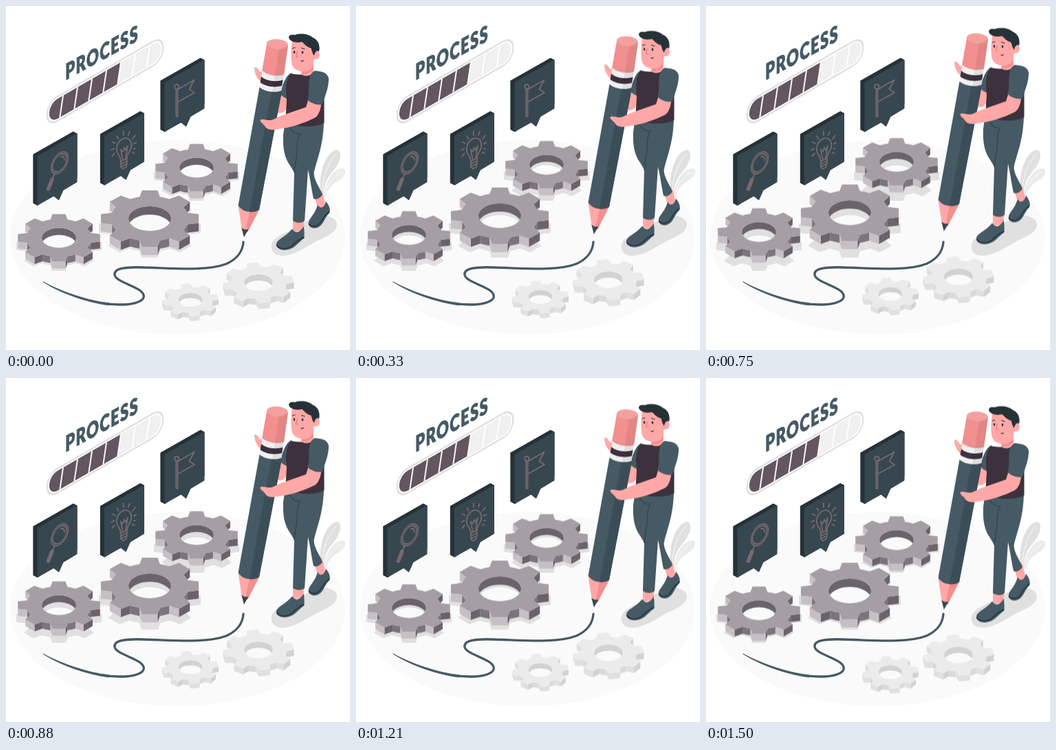
Recreate the animation shown at these times as an HTML page. Size 500 by 500 pixels, loop 1.54 s.

```html
<!DOCTYPE html>
<html lang="en">
<head>
<meta charset="utf-8">
<title>Process</title>
<style>
html, body { margin: 0; width: 100%; height: 100%; overflow: hidden; background: #fff; }
svg { display: block; width: 100%; height: 100%; }
.title { font: 900 32px Lato, "Open Sans", sans-serif; letter-spacing: 2px; fill: #455a64; stroke: #455a64; stroke-width: .9; }
.icon { fill: none; stroke: #75696f; stroke-width: 1.8; stroke-linecap: round; stroke-linejoin: round; }
.skin { fill: #ffa8a7; }
.cloth { fill: #455a64; }
.dark { fill: #263238; }
.line { fill: none; stroke-linecap: round; stroke-linejoin: round; }
</style>
</head>
<body>
<svg viewBox="0 0 500 500">
  <defs>
    <clipPath id="capsule"><rect x="4.5" y="-14.6" width="187.500" height="29" rx="14"/></clipPath>
    <g id="board" stroke-width="2" stroke-linejoin="round">
      <path d="M40.300 216 97.500 183.500 102.500 186 102.500 249 46 289 40.300 286Z" fill="#263238" stroke="#263238"/>
      <path d="M46.500 218.500 102.500 186.500 102.500 255.500 82.500 267.500 76.500 281 69.500 275.500 46.500 288.500Z" fill="#37474f" stroke="#37474f"/>
    </g>
  </defs>

  <ellipse cx="249" cy="336" rx="243.500" ry="141" fill="#fafafa"/>

  <text class="title" transform="matrix(.685 -.375 0 1 86.300 108)">PROCESS</text>
  <g transform="matrix(.866 -.5 0 1 59 158.500)">
    <rect x="1" y="-17.600" width="194.500" height="35.200" rx="17" fill="#fff" stroke="#e0e0e0" stroke-width="2.600"/>
    <g id="bar" clip-path="url(#capsule)">
      <rect width="196" y="-16" height="32" fill="#f0f0f0"/>
      <path d="M0-16H125L119 16H0Z" fill="#63565f"/>
    </g>
  </g>

  <use href="#board"/>
  <use href="#board" x="97.500" y="-29.500"/>
  <use href="#board" x="185" y="-107"/>

  <g class="icon">
    <g transform="matrix(.866 -.5 0 1 78 228)">
      <circle r="14.300"/><circle r="11.800"/>
      <path d="M2-8A8.500 8.500 0 0 1 8 0"/>
    </g>
    <path d="M70.500 244.500 67.500 251"/>
    <path d="M67 252 61.500 266" stroke-width="5.500"/>

    <g transform="translate(-.7 .7)">
      <path d="M167.500 225C168 217 161.500 216 161.500 208 161.500 199 167 193 173 191.500 179 190.500 183 195 183 201.500 183 210 176.500 213 176.500 220.500Z"/>
      <path d="M167.500 225V233L170.500 236 175 233.500 176.500 228V220.500M167.500 229 176.500 224.500M167.500 233 176.500 228.500"/>
      <path d="M170.500 223 167.500 208 170.500 211 172.500 205 174.500 209 177.500 202.500 174.500 221"/>
      <path d="M171.500 187V181.500M178.500 187 180.500 182M184.500 192.500 188.500 187.500M186.500 199.500 190 198M186.500 206.500 188.500 206.500M164 192.500 162 188.500M159.500 199 155.500 197M158 206.500 154 208.500M158.500 213.500 155 217.500M184.500 212 187.500 213.500"/>
    </g>

    <circle cx="248.300" cy="117.300" r="3.300"/>
    <path d="M247.300 121V160.500H249.500V121"/>
    <path d="M249.500 121.500 273.500 107.500 266.500 121 274 126 249.500 139.500"/>
  </g>

  <g class="line" stroke="#455a64">
    <path d="M54 401C80 415 120 429 150 431.700L150 435C118 431 78 417 54 401Z" fill="#455a64" stroke-width=".8"/>
    <path d="M148 433.200C180 436 203 431 200 420 197 408 160 402 158 391 156 381 175 379 200 380 242 381 292 386 321 374.500 337 367 344 357 345 343" stroke-width="3.300"/>
  </g>

  <g fill="#e0e0e0">
    <path d="M457 271C454 240 466 211 481 209 490 211 486 227 477 238 466 250 461 262 462 276Z"/>
    <path d="M461 277C465 252 477 236 489 236 497 238 493 248 483 254 472 260 467 268 465 277Z" fill="#ebebeb"/>
    <path class="line" d="M460 271C460 248 468 228 480 215M463 275C467 259 475 248 488 241" stroke="#fafafa" stroke-width="1" fill="none"/>
    <path d="M386 347C387 338 399 333 413 326L448 307C461 301 480 306 481 317 481 329 466 335 453 341 436 350 422 361 404 363 392 364 384 357 386 347Z"/>
  </g>

  <g id="shadows" fill="#e0e0e0"></g>
  <g id="float">
    <g id="gears"></g>

    <!-- far arm -->
    <path class="skin" d="M399 124 391 153C397 158 405 156 408 148L411 134Z"/>
    <path class="cloth" d="M415 97C406 101 403 114 398 126 400 131 405 134 411 135Z"/>

    <!-- legs -->
    <path class="skin" d="M417 308 417 328 432 326 434 308ZM446 270 454 296 465 290 459 268Z"/>
    <path class="cloth" d="M393 345C395 339 408 334 416 324 421 332 428 329 432.500 320 434 327 434 333 433 338 425 343 420 353 408 354.500 398 356 392 351 393 345Z"/>
    <path class="cloth" d="M440 314C441 308 449 303 453 289 457 296 463 293 465 284 470 290 472 296 470 301 463 307 462 318 453 322 445 325 438 320 440 314Z"/>
    <path class="line" d="M393.500 348C398 354 409 354 415 349 421 344 425 339 433 336M440.500 317C445 322 453 320 457 315 461 308 463 304 470 299" stroke="#263238" stroke-width="1.500"/>
    <path class="cloth" d="M406 166 403 187C402 207 405 221 413 232L419 242 417 312C422 316 430 316 434 312L439 238C442 250 444 266 447 280 452 282 457 279 460 274 455 262 448 254 447.500 243 452 222 461 205 462 168Z"/>
    <path class="line" d="M412 177C417 184 421 186 428 186 425 189 423 196 423 213L419 242" stroke="#37474f" stroke-width="1.600"/>

    <!-- torso and head -->
    <path d="M414 98C425 101 440 100 449 95 458 98 462 105 462.500 120V170C448 178 420 176 406 168L408 137C406 120 407 106 414 98Z" fill="#3d313d"/>
    <path class="skin" d="M429 88 429 99C435 104 444 101 447 96L447 80Z"/>
    <path d="M430 95C437 97 444 92 446 87L446 93C442 98 436 100 430 99Z" fill="#f28f8f"/>
    <path class="skin" d="M416 51C414 63 414 76 415.500 84 417 92 426 96 434 95 442 93 446 85 448 77 455 79 457 72 455 67 453 64 450 66 448 69L446 50Z"/>
    <path class="dark" d="M411 46C411 42 415 41 420 42 429 39 441 41 446 46 454 49 457 58 455 66 452 64 449 67 448 72 445 70 445 64 443 61 437 60 434 55 430 52 424 54 413 53 411 46Z"/>
    <g class="line" stroke="#263238" stroke-width="1.200">
      <path d="M416.500 61.500 420 60.500M429.500 61 434 62.500"/>
      <path d="M423.500 66 421.500 73.500 424.500 74.500" stroke="#e77f82"/>
    </g>
    <path d="M427.500 79C429 80 431.500 79.500 433 78 432.500 81.500 429.500 82 427.500 79Z" fill="#3d313d"/>
    <ellipse class="dark" cx="419" cy="67" rx="1.300" ry="1.900"/>
    <ellipse class="dark" cx="431" cy="67.500" rx="1.300" ry="1.900"/>

    <!-- pencil -->
    <path class="skin" d="M361 90C363 87 367 92 369 96L376 94 374 112C366 108 361 99 361 90Z"/>
    <path class="skin" d="M337.500 290 343 326 351 329 368 296Z"/>
    <path d="M354 298 348 328 351 329 368 296Z" fill="#f28f8f"/>
    <path d="M342.300 322C345 325 349 325.500 352.500 324.500L345.800 336Z" fill="#37474f"/>
    <path d="M368.500 118 337.500 290C341 295 347 299 354 299 360 300 365 298 368 296L401.500 121Z" fill="#455a64"/>
    <path d="M386.500 120 354 299C360 300 365 298 368 296L401.500 121Z" fill="#3b4e58"/>
    <path d="M379 55 372 95C380 102 394 104 404 100L410 57Z" fill="#f28f8f"/>
    <ellipse cx="394.500" cy="55.500" rx="15.500" ry="7.300" fill="#f4a09f" transform="rotate(5 394 55)"/>
    <path d="M372.500 94C380 101 394 103 404 100L400.500 123C389 127 375 124 368.500 118Z" fill="#f0f0f0"/>
    <path d="M371 102.500C378 109 392 111 402.500 107.500L401 116C390 119 377 117 369.500 111Z" fill="#3d313d"/>
    <path d="M397 63 410 57 400.500 123 387 125Z" fill="#000" opacity=".07"/>

    <!-- near arm -->
    <path class="skin" d="M440 134 436 147 403 158.500C396 160 391 165 385 166 378 166 371 163 369.500 166 369 169 374 171 376 174 379 180 386 181 394 179 414 177 434 170 448 163 456 159 458 147 459 136Z"/>
    <path class="cloth" d="M449 94C458 95 467 96 469 105 469.500 117 464 131 459.500 143 452 145 443 141 438 136 442 128 439 116 441 106 442 100 445 96 449 94Z"/>
  </g>
</svg>

<script>
const $ = id => document.getElementById(id);
const TILT = 0.577, TEETH = 8;

function add(parent, d, fill) {
  const el = document.createElementNS("http://www.w3.org/2000/svg", "path");
  el.setAttribute("d", d);
  el.setAttribute("fill-rule", "evenodd");
  el.setAttribute("fill", fill);
  parent.append(el);
  return el;
}

const poly = pts => "M" + pts.map(p => p.map(v => v.toFixed(1)).join(" ")).join("L") + "Z";
const ring = (x, y, rx) =>
  `M${x - rx} ${y}a${rx} ${rx * TILT} 0 1 0 ${2 * rx} 0a${rx} ${rx * TILT} 0 1 0 ${-2 * rx} 0Z`;

// [angle in degrees, radius, whether a body wall starts here]
const tooth = [[-15, .79], [-9, 1], [9, 1], [15, .79, true], [22.5, .79, true]];

function outline(x, y, r, turn) {
  const pts = [];
  for (let i = 0; i < TEETH; i++)
    for (const [deg, k, body] of tooth) {
      const a = (i * 360 / TEETH + deg + turn) * Math.PI / 180;
      const p = [x + r * k * Math.cos(a), y + r * k * TILT * Math.sin(a)];
      p.body = body;
      pts.push(p);
    }
  return pts;
}

// light comes from the left
function tone(p, q) {
  if (p.body) return "body";
  const nx = (q[1] - p[1]) / TILT, ny = p[0] - q[0];
  return nx / Math.hypot(nx, ny) > .2 ? "dark" : "light";
}

function gear({ x, y, r, hole, depth, turn = 0, colors }) {
  const out = $("gears"), pts = outline(x, y, r, turn);
  const walls = { body: "", dark: "", light: "" };
  pts.forEach((p, i) => {
    const q = pts[(i + 1) % pts.length];
    if (q[0] < p[0]) walls[tone(p, q)] += poly([p, q, [q[0], q[1] + depth], [p[0], p[1] + depth]]);
  });
  for (const kind in walls) add(out, walls[kind], colors[kind]).setAttribute("fill-rule", "nonzero");

  const ry = hole * TILT, h = depth / 2, w = hole * Math.sqrt(1 - (h / ry) ** 2);
  add(out, `M${x - w} ${y + h}A${hole} ${ry} 0 1 1 ${x + w} ${y + h}A${hole} ${ry} 0 0 0 ${x - w} ${y + h}Z`, colors.dark);
  add(out, poly(pts) + ring(x, y, hole), colors.top);
}

function shadow({ x, y, r, hole, depth }) {
  const gy = y + depth + 2;
  add($("shadows"), poly(outline(x, gy, r * 1.04, 0)) + ring(x, gy - 1, hole), "#e0e0e0");
}

const steel = { top: "#a59fa4", body: "#7d747b", dark: "#6b626a", light: "#c6bfc4" };
const pale = { top: "#ebebeb", body: "#dadada", dark: "#d2d2d2", light: "#e0e0e0" };
const large = [
  { x: 277, y: 235, r: 60.5, hole: 25, depth: 10, colors: steel },
  { x: 77, y: 337, r: 60.5, hole: 25, depth: 10, colors: steel },
  { x: 209, y: 309, r: 72, hole: 31, depth: 12, colors: steel },
];
const small = [
  { x: 367, y: 402, r: 51.5, hole: 21, depth: 9, turn: -10, colors: pale },
  { x: 268, y: 427, r: 41, hole: 17.5, depth: 7.5, turn: -10, colors: pale },
];
large.forEach(shadow);
[...large, ...small].forEach(gear);

let cuts = "";
for (let i = 0; i < 7; i++) cuts += `M${28 + 24.25 * i}-16l-6 32`;
const gaps = add($("bar"), cuts, "none");
gaps.setAttribute("stroke", "#fff");
gaps.setAttribute("stroke-width", 2.4);

// linear rise and fall
const LOOP = 1540;
$("float").animate(
  [[0, 0], [705, -9.15], [1475, .85], [LOOP, 0]].map(([t, y]) => ({ offset: t / LOOP, transform: `translateY(${y}px)` })),
  { duration: LOOP, iterations: Infinity }
);
</script>
</body>
</html>
```
